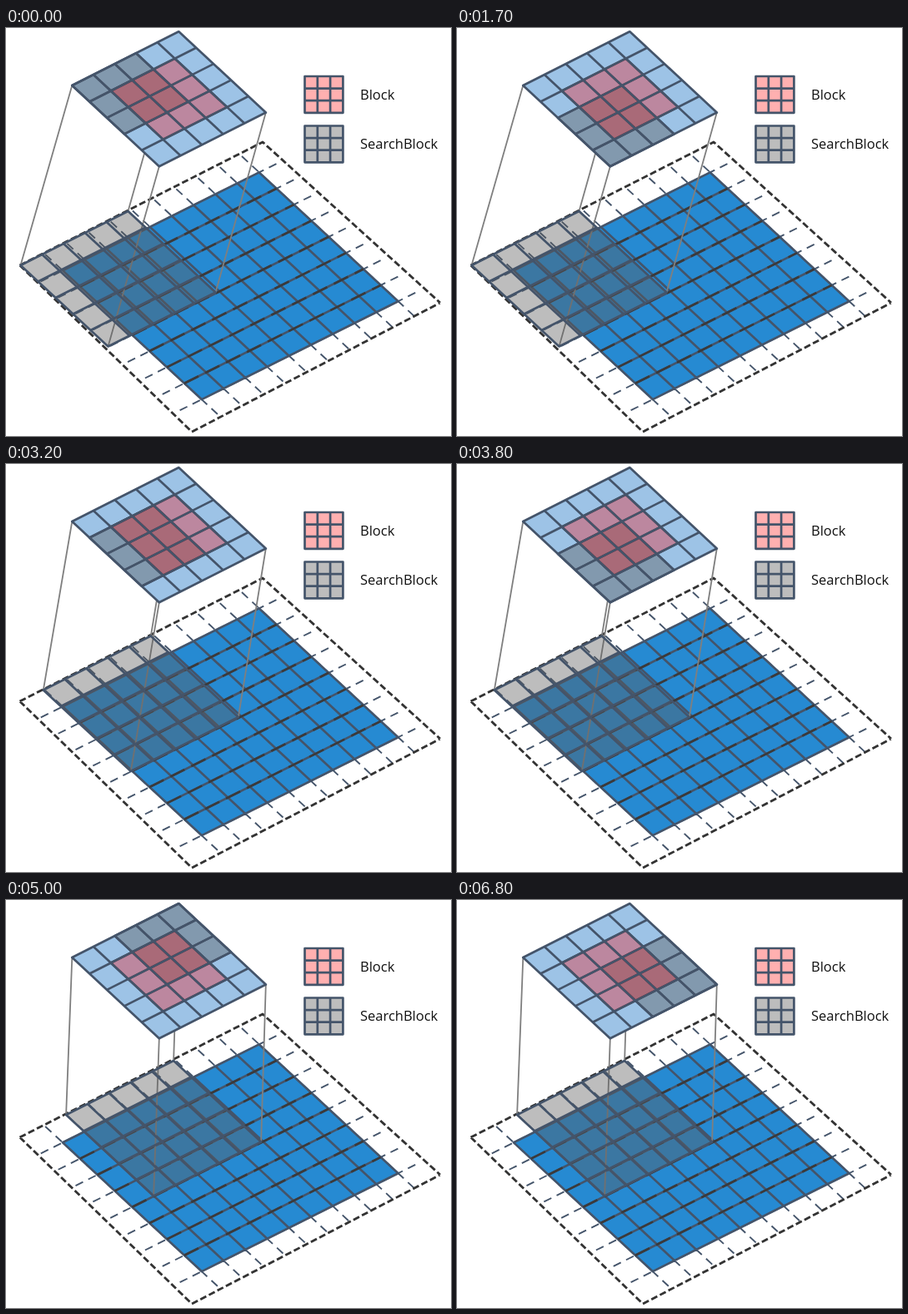
An HTML page that plays this animation: 534 by 490 pixels, repeating every 7300 ms.

```html
<!DOCTYPE html>
<html lang="en">
<head>
<meta charset="utf-8">
<title>Block search</title>
<style>
  html, body { margin: 0; width: 100%; height: 100%; overflow: hidden; background: #fff; }
  svg { display: block; }
  path { fill: none; stroke: #44546a; stroke-width: 2.7; stroke-linejoin: round; }
  text { font: 16.5px "Open Sans", "Noto Sans", sans-serif; fill: #111; }
  .outer { stroke: #333; stroke-width: 2.8; stroke-dasharray: 8 3.5; }
  .margin { stroke-width: 1.9; stroke-dasharray: 10 7; }
  .image { fill: #268ad2; }
  .rows { stroke: #3a3a3c; stroke-dasharray: 19 9; }
  .shade { fill: rgba(91, 91, 91, .4); }
  .zoom { fill: #9dc3e6; }
  .block { fill: rgba(255, 0, 0, .31); }
  .link { stroke: #7f7f7f; stroke-width: 1.8; }
</style>
</head>
<body>
<svg id="stage" width="534" height="490" viewBox="0 0 534 490"></svg>
<script>
const stage = document.getElementById('stage');

function add(tag, className, attrs = {}) {
  const node = document.createElementNS(stage.namespaceURI, tag);
  node.setAttribute('class', className);
  for (const key in attrs) node.setAttribute(key, attrs[key]);
  return stage.appendChild(node);
}

// A lattice maps cell coordinates to the stage: left corner, then both cell edges.
const lattice = (x, y, ux, uy, vx, vy) => (u, v) =>
  [x + ux * u + vx * v, y + uy * u + vy * v];

const line = (...points) => 'M' + points.map(p => p.join()).join('L');
const span = (from, to) => Array.from({ length: to - from + 1 }, (_, i) => from + i);
const corners = (at, w, h) => [at(0, 0), at(w, 0), at(w, h), at(0, h)];

// Rules between the cells; pad also draws the border rules and extends all of them.
const rows = (at, w, h, pad = 0) => span(1 - pad, h - 1 + pad)
  .map(v => line(at(-pad, v), at(w + pad, v))).join('');
const columns = (at, w, h, pad = 0) => span(1 - pad, w - 1 + pad)
  .map(u => line(at(u, -pad), at(u, h + pad))).join('');

const grid = (at, w, h) =>
  line(...corners(at, w, h)) + 'Z' + rows(at, w, h) + columns(at, w, h);

const shifted = (at, du, dv) => (u, v) => at(u + du, v + dv);

const image = lattice(68, 291.3, 26.2, -13.1, 20.85, 19.35);
const zoom = lattice(79.3, 69, 25.6, -12.95, 20.9, 19.45);
const windowAt = k => lattice(17.5 + 27.3 * k, 285 - 13.5 * k, 25.8, -13, 21, 19.5);

add('path', 'margin', { d: rows(image, 9, 8, 1) + columns(image, 9, 8, 1) });
const [left, top_, right, bottom] = [[16.5, 285], [308, 137], [521, 330], [223, 485]];
add('path', 'outer', { d: line(left, top_, right) + line(left, bottom, right) });
add('path', 'image', { d: grid(image, 9, 8) });
add('path', 'rows', { d: rows(image, 9, 8) });
const links = add('path', 'link');
const windowPath = add('path', 'shade');
add('path', 'zoom', { d: grid(zoom, 5, 5) });
const searchPath = add('path', 'shade');
add('path', 'block', { d: grid(shifted(zoom, 1, 1), 3, 3) });

function legend(y, className, label) {
  add('path', className, { d: grid(lattice(358.5, y, 15.3, 0, 0, 14.6), 3, 3) });
  add('text', '', { x: 425, y: y + 27.5 }).textContent = label;
}
legend(58, 'block', 'Block');
legend(117.5, 'shade', 'SearchBlock');

// The pace is slow at both ends; step starts snap to tenths of a second.
const pace = [[0, 0], [1, 530], [9, 2470], [19, 4740], [24, 5990], [27, 7260]];
const steps = 27;

function startOf(step) {
  const k = pace.findIndex(([s]) => s > step);
  const [s1, t1] = pace.at(k < 0 ? -1 : k);
  const [s0, t0] = pace.at(k < 0 ? -2 : k - 1);
  return 100 * Math.round((t0 + (t1 - t0) * (step - s0) / (s1 - s0)) / 100);
}

const starts = span(0, steps).map(startOf);
const loop = starts[steps];

// Three windows; in each, the search block visits a 3 by 3 set of cells row by row.
function show(step) {
  const at = windowAt(Math.floor(step / 9));
  const u = step % 3;
  const v = Math.floor(step % 9 / 3);
  const ends = corners(at, 5, 5);

  windowPath.setAttribute('d', grid(at, 5, 5));
  links.setAttribute('d', corners(zoom, 5, 5).map((p, i) => line(p, ends[i])).join(''));
  searchPath.setAttribute('d', grid(shifted(zoom, u, v), 3, 3));
}

let shown = -1;
const begin = performance.now();

function tick() {
  const time = (performance.now() - begin) % loop;
  const step = starts.findIndex(start => start > time) - 1;
  if (step !== shown) show(shown = step);
  requestAnimationFrame(tick);
}
tick();
</script>
</body>
</html>
```
